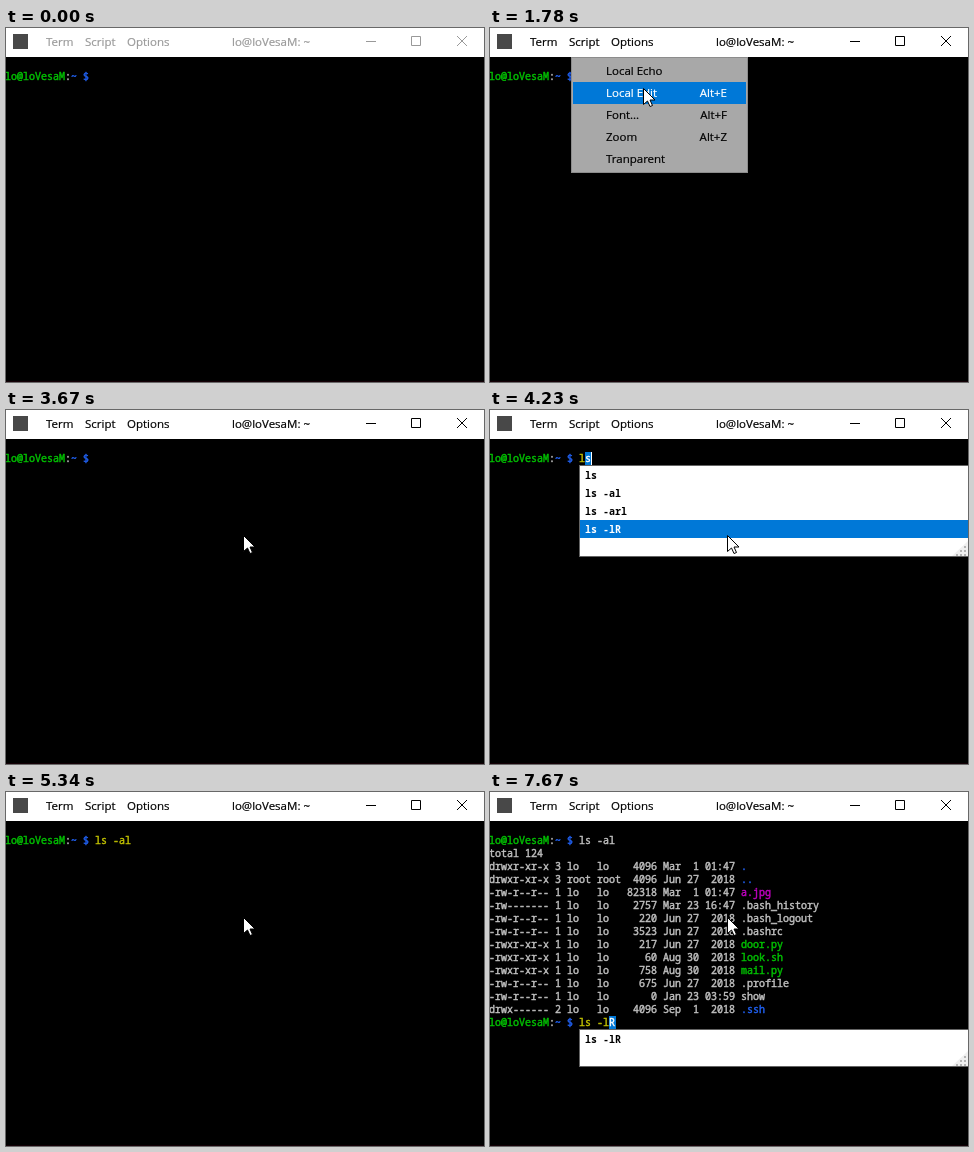
An HTML page with a canvas for the animation above (8 s loop, 478 px wide and 354 px high).

```html
<!DOCTYPE html>
<html lang="en">
<head>
<meta charset="utf-8">
<title>Terminal</title>
<style>
html, body { margin: 0; width: 100%; height: 100%; overflow: hidden; background: #000; }
canvas { display: block; }
</style>
</head>
<body>
<canvas id="stage" width="478" height="354"></canvas>
<script>
const ctx = document.getElementById('stage').getContext('2d');
const LOOP = 8000;
const UI = '11.5px "Open Sans", "Noto Sans", sans-serif';
const MONO = '10px "Noto Sans Mono", "DejaVu Sans Mono", monospace';
const COL = 6, ROW = 13, LEFT = -1, TOP = 42;
const GREEN = '#00c000', YELLOW = '#c0c000', BLUE = '#2060f0',
      MAGENTA = '#c000c0', GREY = '#c0c0c0', SELECT = '#0078d7';
const USER = 'lo', HOST = 'loVesaM';

const MENU = [['Local Echo'], ['Local Edit', 'Alt+E'], ['Font...', 'Alt+F'],
              ['Zoom', 'Alt+Z'], ['Tranparent']];
const HISTORY = ['ls', 'ls -al', 'ls -arl', 'ls -lR'];

// mode, links, owner, size, date, name, colour
const FILES = [
  ['drwxr-xr-x', 3, USER, 4096, 'Mar  1 01:47', '.', BLUE],
  ['drwxr-xr-x', 3, 'root', 4096, 'Jun 27  2018', '..', BLUE],
  ['-rw-r--r--', 1, USER, 82318, 'Mar  1 01:47', 'a.jpg', MAGENTA],
  ['-rw-------', 1, USER, 2757, 'Mar 23 16:47', '.bash_history', GREY],
  ['-rw-r--r--', 1, USER, 220, 'Jun 27  2018', '.bash_logout', GREY],
  ['-rw-r--r--', 1, USER, 3523, 'Jun 27  2018', '.bashrc', GREY],
  ['-rwxr-xr-x', 1, USER, 217, 'Jun 27  2018', 'door.py', GREEN],
  ['-rwxr-xr-x', 1, USER, 60, 'Aug 30  2018', 'look.sh', GREEN],
  ['-rwxr-xr-x', 1, USER, 758, 'Aug 30  2018', 'mail.py', GREEN],
  ['-rw-r--r--', 1, USER, 675, 'Jun 27  2018', '.profile', GREY],
  ['-rw-r--r--', 1, USER, 0, 'Jan 23 03:59', 'show', GREY],
  ['drwx------', 2, USER, 4096, 'Sep  1  2018', '.ssh', BLUE]
];

// time, typed text, suggested rest, popup open
const TYPING = [
  [0, '', '', false],
  [4230, 'l', 's', true],
  [4330, 'ls ', '-al', true],
  [4550, 'ls -', 'al', true],
  [4670, 'ls -a', 'l', true],
  [4790, 'ls -al', '', false],
  [5560, '', '', false],
  [6110, 'ls', '', true],
  [6230, 'ls ', '-al', true],
  [6350, 'ls -', 'al', true],
  [6570, 'ls -l', 'R', true]
];

// time, x, y of the pointer tip
const PATH = [
  [320, 300, 336], [990, 151, 18], [1100, 145, 12], [1220, 145, 12],
  [1770, 153, 60], [2120, 153, 60], [2325, 157, 64], [2655, 237, 125]
];
const ARROW = [[0, 0], [0, 16], [4, 12.5], [6.5, 18], [9, 17], [6.5, 11.5], [11.5, 11.5]];

// times at which the caret flips, starting hidden
const BLINKS = [320, 870, 1100, 1570, 2120, 2670, 3220, 3670, 4230, 5340, 5680, 6570, 7120, 7670];

const within = (t, a, b) => t >= a && t < b;

function box(x, y, w, h, color) {
  ctx.fillStyle = color;
  ctx.fillRect(x, y, w, h);
}

// a thin outline of the given weight makes the letters firmer
function label(text, x, y, color, { font = UI, align = 'left', weight = 0.2 } = {}) {
  ctx.font = font;
  ctx.textAlign = align;
  ctx.fillStyle = ctx.strokeStyle = color;
  ctx.fillText(text, x, y);
  if (!weight) return;
  ctx.lineWidth = weight;
  ctx.lineJoin = 'round';
  ctx.strokeText(text, x, y);
}

function line(...points) {
  ctx.beginPath();
  points.forEach(([x, y]) => ctx.lineTo(x, y));
  ctx.stroke();
}

const colX = col => LEFT + col * COL;
const rowY = row => TOP + row * ROW;

function put(text, col, row, color) {
  label(text, colX(col), rowY(row) + 10, color, { font: MONO, weight: 0.45 });
}

function titleBar(active) {
  const ink = active ? '#000' : '#999';
  box(0, 0, 478, 29, '#fff');
  box(7, 6, 15, 15, '#484848');
  label('Term', 40, 18, ink);
  label('Script', 79, 18, ink);
  label('Options', 121, 18, ink);
  label(`${USER}@${HOST}: ~`, 226, 18, ink);
  ctx.strokeStyle = ink;
  ctx.lineWidth = 1;
  line([360, 13.5], [370, 13.5]);
  ctx.strokeRect(405.5, 8.5, 9, 9);
  line([451, 8], [461, 18]);
  line([461, 8], [451, 18]);
}

function prompt(row) {
  const who = `${USER}@${HOST}`;
  put(who, 0, row, GREEN);
  put(':', who.length, row, GREY);
  put('~ $', who.length + 1, row, BLUE);
}

function listing() {
  put('ls -al', 15, 0, GREY);
  put('total 124', 0, 1, GREY);
  FILES.forEach(([mode, links, owner, size, date, name, color], i) => {
    const info = `${mode} ${links} ${owner.padEnd(5)}${owner.padEnd(4)}` +
      `${String(size).padStart(6)} ${date}`;
    put(info, 0, i + 2, GREY);
    put(name, 42, i + 2, color);
  });
}

function menu(mouse) {
  box(81, 29, 177, 116, '#8c8c8c');
  box(82, 30, 175, 114, '#a8a8a8');
  MENU.forEach(([name, key], i) => {
    const y = 32 + i * 22;
    const hover = within(mouse.y, y, y + 22);
    const ink = hover ? '#fff' : '#000';
    if (hover) box(83, y, 173, 22, SELECT);
    label(name, 116, y + 15, ink);
    if (key) label(key, 237, y + 15, ink, { align: 'right' });
  });
}

function popup(top, items, mouse) {
  const h = 18 * (items.length + 1) + 2;
  const bottom = top + h;
  box(89, top, 389, h, '#646464');
  box(90, top + 1, 388, h - 2, '#fff');
  items.forEach((text, i) => {
    const y = top + 1 + i * 18;
    const hover = mouse && within(mouse.y, y, y + 18);
    if (hover) box(90, y, 388, 18, SELECT);
    label(text, 95, y + 13, hover ? '#fff' : '#000', { font: 'bold ' + MONO, weight: 0 });
  });
  ctx.fillStyle = '#f0f0f0';
  ctx.beginPath();
  ctx.moveTo(478, bottom - 16);
  ctx.lineTo(478, bottom - 1);
  ctx.lineTo(462, bottom - 1);
  ctx.fill();
  for (let r = 0; r < 3; r++)
    for (let c = 0; c <= r; c++)
      box(474 - c * 4, bottom - 11 + r * 4, 2, 2, '#b4b4b4');
}

function pointer(t) {
  if (t < 320 || within(t, 4330, 4790) || within(t, 6110, 6570)) return null;
  // the pointer is sampled about nine times a second
  const s = 320 + Math.floor((t - 320) / 111.4) * 111.4;
  const i = PATH.findIndex(p => p[0] > s);
  if (i < 0) {
    const [, x, y] = PATH[PATH.length - 1];
    return { x, y };
  }
  const [t0, x0, y0] = PATH[i - 1], [t1, x1, y1] = PATH[i];
  const u = (s - t0) / (t1 - t0);
  const k = u * u * (3 - 2 * u);
  return { x: Math.round(x0 + (x1 - x0) * k), y: Math.round(y0 + (y1 - y0) * k) };
}

function drawPointer({ x, y }) {
  ctx.beginPath();
  ARROW.forEach(([dx, dy]) => ctx.lineTo(x + dx + 0.5, y + dy + 0.5));
  ctx.closePath();
  ctx.fillStyle = '#fff';
  ctx.fill();
  ctx.strokeStyle = '#000';
  ctx.lineWidth = 1;
  ctx.stroke();
}

function draw(t) {
  const mouse = pointer(t);
  const listed = t >= 5560;
  const row = listed ? 14 : 0;
  const [, typed, rest, open] = TYPING.filter(s => s[0] <= t).pop();
  const full = typed + rest;

  box(0, 0, 478, 354, '#000');
  box(0, 353, 478, 1, '#140006');
  prompt(0);
  if (listed) listing();
  if (t >= 5680) prompt(14);

  put(typed, 15, row, YELLOW);
  const restCol = 15 + typed.length;
  if (rest) {
    box(colX(restCol), rowY(row), rest.length * COL + 1, ROW, SELECT);
    put(rest, restCol, row, '#fff');
  }
  if (BLINKS.filter(b => b <= t).length % 2)
    box(colX(15 + full.length), rowY(row), 1, ROW, '#fff');

  if (open) popup(rowY(row + 1), HISTORY.filter(h => h.startsWith(typed)), mouse);
  titleBar(t >= 1100);
  if (within(t, 1220, 2010)) menu(mouse);
  if (mouse) drawPointer(mouse);
}

const start = performance.now();
function tick() {
  draw((performance.now() - start) % LOOP);
  requestAnimationFrame(tick);
}
tick();
</script>
</body>
</html>
```
